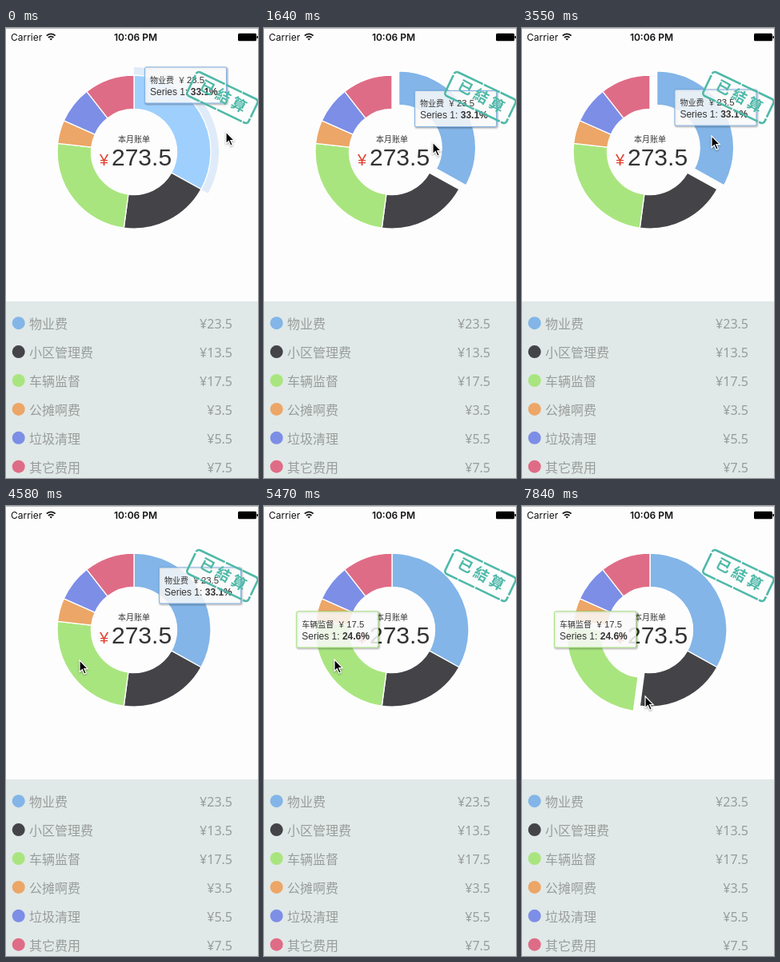
An HTML page that plays this animation: 315x563 px, repeating every 7990 ms.

```html
<!DOCTYPE html>
<html lang="zh">
<head>
<meta charset="utf-8">
<style>
html, body { margin: 0; width: 100%; height: 100%; overflow: hidden; background: #fdfdfd; }
svg { display: block; width: 315px; height: 563px; }
text { white-space: pre; }
.ui { font-family: Inter, Roboto, sans-serif; font-size: 12px; fill: #111; }
.chart { font-family: "Liberation Sans", "Noto Sans CJK SC", sans-serif; fill: #333; }
.cjk { font-family: "Noto Sans CJK SC", "Noto Sans CJK", sans-serif; }
.price { font-family: "Noto Sans", "Open Sans", sans-serif; }
.list { font-size: 16px; fill: #999c9b; }
</style>
</head>
<body>
<svg viewBox="0 0 315 563">
  <rect width="315" height="563" fill="#fdfdfd"/>
  <rect width="315" height="1" fill="#bbb"/>
  <g class="ui">
    <text x="6" y="15.5">Carrier</text>
    <text x="162" y="15.5" text-anchor="middle" font-weight="600">10:06 PM</text>
  </g>
  <g fill="none" stroke="#111" stroke-width="1.8">
    <path d="M50.8 9.6a7.6 7.6 0 0 1 10.8 0M53 12a4.6 4.6 0 0 1 6.4 0"/>
    <path d="M54.4 13.6L56.2 15.6L58 13.6Q56.2 12.2 54.4 13.6z" fill="#111" stroke="none"/>
  </g>
  <rect x="290" y="6.8" width="23" height="9.4" rx="1.5" fill="#000"/>
  <rect x="313.5" y="10" width="1.5" height="3" fill="#000"/>

  <path id="halo" fill-opacity=".25"/>
  <g id="slices" stroke="#fff" stroke-width="1.3" stroke-linejoin="round"></g>
  <g class="chart">
    <text x="160" y="142.5" font-size="10" text-anchor="middle">本月账单</text>
    <text x="117" y="172" font-size="20" style="fill:#e0412f">¥</text>
    <text x="132" y="172" font-size="30">273.5</text>
  </g>

  <g id="tip" class="chart">
    <g fill="none" stroke="#000" transform="translate(1 1)">
      <rect x=".5" y=".5" width="102" height="45" rx="2" stroke-width="5" stroke-opacity=".05"/>
      <rect x=".5" y=".5" width="102" height="45" rx="2" stroke-width="3" stroke-opacity=".1"/>
      <rect x=".5" y=".5" width="102" height="45" rx="2" stroke-opacity=".15"/>
    </g>
    <rect id="box" x=".5" y=".5" width="102" height="45" rx="2" fill="#f9f9f9" fill-opacity=".85"/>
    <text id="name" x="7" y="20" font-size="10"></text>
    <text id="yen" y="20" font-size="10">￥</text>
    <text id="cost" y="20" font-size="11.3"></text>
    <text x="7" y="35" font-size="12">Series 1: <tspan id="share" font-weight="bold"></tspan></text>
  </g>

  <g transform="translate(270.5 87) rotate(25.6)" fill="#4fb9a8">
    <rect x="-42.5" y="-16.5" width="85" height="33" rx="4" fill="none" stroke="#4fb9a8"
      stroke-width="2.6" stroke-dasharray="34 1.5 22 1 44 2 12 1.5"/>
    <g class="cjk" font-size="18.5" font-weight="700" text-anchor="middle">
      <text transform="translate(-22 -3) rotate(3)" y="6.5">已</text>
      <text transform="translate(.3 -1.5) rotate(3)" y="6.5">結</text>
      <text transform="translate(22.5 -.5) rotate(3)" y="6.5">算</text>
    </g>
  </g>

  <rect y="342" width="315" height="221" fill="#e0e9e7"/>
  <g id="list" class="list"></g>

  <path id="cursor" d="M0 0V14.6L3.3 11.6L5.8 17.2L8.2 16.1L5.8 10.7H10.3z" fill="#000"
    stroke="#fff" stroke-width="1.2" style="filter:drop-shadow(0 1px 1px rgba(0,0,0,.35))"/>
</svg>
<script>
const LOOP = 7990, STEP = 147.8, TICK = 32;
const CX = 160, CY = 155, OUTER = 96, INNER = 53.5, SHIFT = 10;
const $ = id => document.getElementById(id);

function add(parent, tag, attrs, text = '') {
  const el = document.createElementNS('http://www.w3.org/2000/svg', tag);
  for (const key in attrs) el.setAttribute(key, attrs[key]);
  el.textContent = text;
  return parent.appendChild(el);
}

const items = [
  ['物业费', 23.5, '#83b5e8'],
  ['小区管理费', 13.5, '#444448'],
  ['车辆监督', 17.5, '#a9e57f'],
  ['公摊啊费', 3.5, '#eca667'],
  ['垃圾清理', 5.5, '#7d8ee7'],
  ['其它费用', 7.5, '#df6c86']
].map(([name, cost, color]) => ({ name, cost, color }));
const total = items.reduce((sum, it) => sum + it.cost, 0);

const polar = (r, a) => `${CX + r * Math.sin(a)} ${CY - r * Math.cos(a)}`;
function ring(a, b, r0, r1) {
  const big = b - a > Math.PI ? 1 : 0;
  return `M${polar(r1, a)}A${r1} ${r1} 0 ${big} 1 ${polar(r1, b)}` +
    `L${polar(r0, b)}A${r0} ${r0} 0 ${big} 0 ${polar(r0, a)}z`;
}

let angle = 0;
items.forEach((it, i) => {
  const end = angle + it.cost / total * 2 * Math.PI;
  it.mid = (angle + end) / 2;
  it.halo = ring(angle, end, OUTER, OUTER + 10);
  it.el = add($('slices'), 'path', { d: ring(angle, end, INNER, OUTER), fill: it.color });
  angle = end;
  const y = 369.2 + 35.9 * i;
  add($('list'), 'circle', { cx: 15.7, cy: y, r: 8, fill: it.color });
  add($('list'), 'text', { x: 29, y: y + 6.8, class: 'cjk' }, it.name);
  add($('list'), 'text', { x: 283, y: y + 6.8, class: 'price', 'text-anchor': 'end' }, '¥' + it.cost);
});
const [blue, , green] = items;

// step, x, y
const cursorPath = [
  [0, 275, 130], [1, 250, 134], [2, 235, 137], [9, 235, 137], [11, 211, 143],
  [16, 92, 184], [18, 85, 187], [19, 160, 152], [20, 246, 117], [21, 240, 130],
  [22, 237, 135], [27, 237, 135], [30, 110, 185], [31, 92, 193], [33, 92, 193],
  [34, 88, 192], [44, 88, 192], [48, 73, 255], [49, 73, 266], [50, 76, 268],
  [52, 104, 232], [53, 154, 238]
];
const tipMoves = [[4.567, 188, 78], [23.1, 191, 76.5], [33.5, 40, 131.5]];

function along(path, k) {
  const i = path.findIndex(p => p[0] >= k);
  if (i < 1) return path[i < 0 ? path.length - 1 : 0].slice(1);
  const [a, b] = [path[i - 1], path[i]];
  const f = (k - a[0]) / (b[0] - a[0]);
  return [a[1] + (b[1] - a[1]) * f, a[2] + (b[2] - a[2]) * f];
}

function swing(k, from, to) {
  const f = Math.min(1, Math.max(0, (k - from) / (to - from)));
  return (1 - Math.cos(f * Math.PI)) / 2;
}

// each tick closes a third of the gap in x and half of it in y
function tipAt(k) {
  let x = 173, y = 48.5;
  for (const [start, tx, ty] of tipMoves) {
    if (k < start) break;
    const n = (k - start) * STEP / TICK;
    x = tx + (x - tx) * (2 / 3) ** n;
    y = ty + (y - ty) * .5 ** n;
  }
  return [x, y];
}

const place = (el, [x, y]) => el.setAttribute('transform', `translate(${x.toFixed(2)} ${y.toFixed(2)})`);
const slide = (it, f) =>
  place(it.el, [SHIFT * f * Math.sin(it.mid), -SHIFT * f * Math.cos(it.mid)]);

function draw(t) {
  const k = Math.floor((t + 6) / STEP);
  slide(blue, swing(k, 6.5, 10) - swing(k, 25.4, 28.5));
  slide(green, swing(k, 38, 40));

  const hot = k < 7 ? blue : k === 38 ? green : null;
  blue.el.setAttribute('fill', hot === blue ? '#9fd0fd' : blue.color);
  green.el.setAttribute('fill', hot === green ? '#c2fe98' : green.color);
  $('halo').setAttribute('d', hot ? hot.halo : '');
  $('halo').setAttribute('fill', hot ? hot.color : 'none');

  const it = k < 34 ? blue : green;
  const x = 7 + it.name.length * 10;
  place($('tip'), tipAt(k));
  $('box').setAttribute('stroke', it.color);
  $('name').textContent = it.name;
  $('yen').setAttribute('x', x + 4.5);
  $('cost').setAttribute('x', x + 16);
  $('cost').textContent = it.cost;
  $('share').textContent = (it.cost / total * 100).toFixed(1) + '%';

  place($('cursor'), along(cursorPath, k));
}

const begin = performance.now();
function loop() {
  draw((performance.now() - begin) % LOOP);
  requestAnimationFrame(loop);
}
loop();
</script>
</body>
</html>
```
